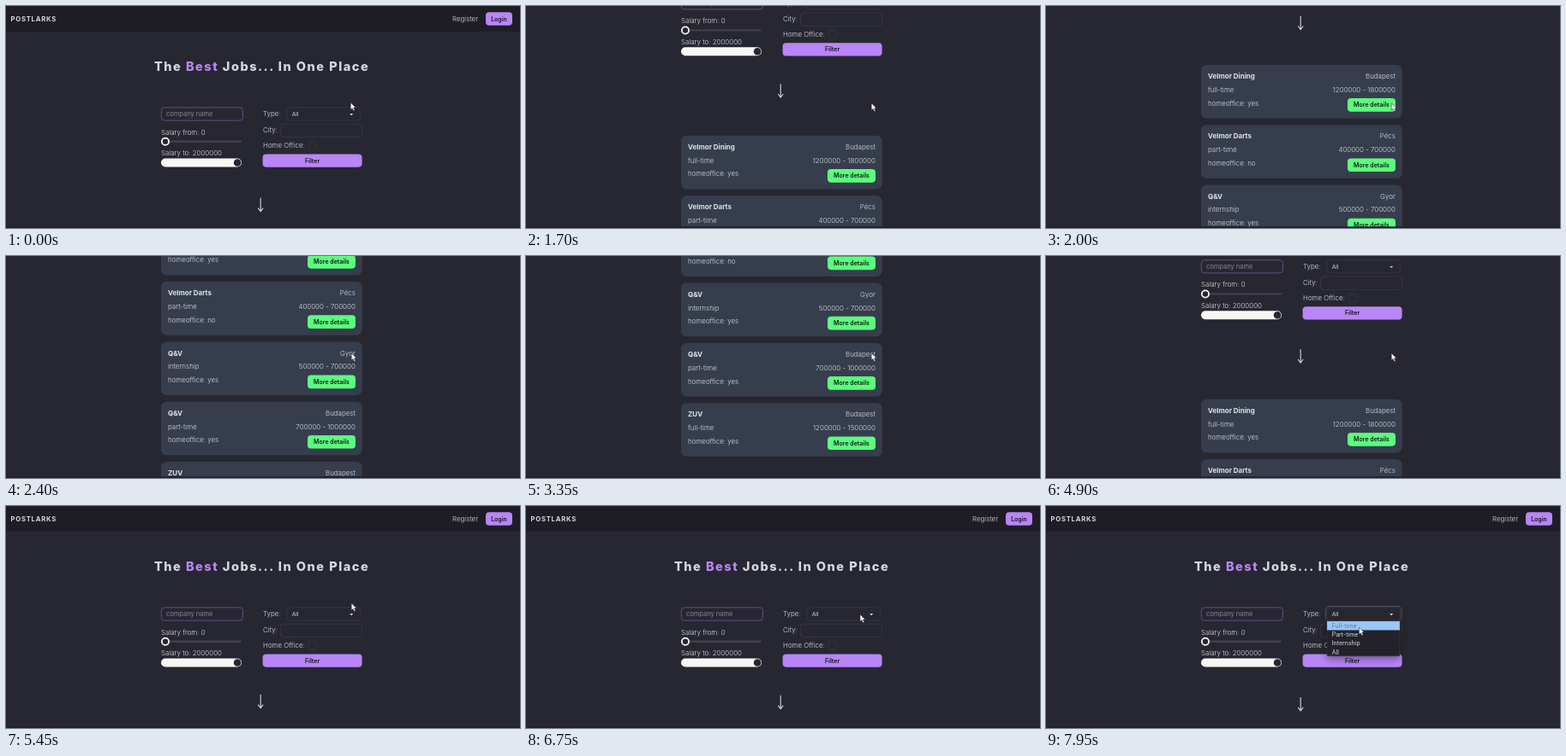
An HTML page for the animation above (8 s loop, 600x260 px).

```html
<!DOCTYPE html>
<html lang="en">
<head>
<meta charset="utf-8">
<title>Job board</title>
<style>
  html, body { margin: 0; width: 100%; height: 100%; overflow: hidden; background: #272731; }
  svg { display: block; width: 600px; height: 260px; }
  text { font: 350 7.95px Inter, "Open Sans", sans-serif; fill: #d9dae1; white-space: pre; }
  .end { text-anchor: end; }
  .mid { text-anchor: middle; }
  .button { font-size: 7px; font-weight: 600; fill: #17151f; text-anchor: middle; }
  .small { font-size: 7px; font-weight: 400; }
  .value { font-size: 6.5px; font-weight: 400; }
  .hint { font-size: 7.5px; font-weight: 400; fill: #85858f; }
  .title { font-size: 8px; font-weight: 700; fill: #dfe2e8; }
  .logo { font-size: 7.7px; font-weight: 700; letter-spacing: .1em; }
  .headline { font-size: 14.6px; font-weight: 800; letter-spacing: .1em; fill: #d5d9df; }
  .field { fill: none; stroke: #3e3d48; stroke-width: .7; }
</style>
</head>
<body>
<svg id="stage" viewBox="0 0 600 260"></svg>
<script>
const LOOP = 8000;
const PURPLE = '#b985f7', GREEN = '#5bfd7c', WHITE = '#f8f8f2', BACK = '#272731';

const text = (x, y, content, cls = '') => `<text x="${x}" y="${y}" class="${cls}">${content}</text>`;
const box = (x, y, w, h, r, attrs) =>
  `<rect x="${x}" y="${y}" width="${w}" height="${h}" rx="${r}" ${attrs}/>`;
const button = (x, y, w, h, color, label) =>
  box(x, y, w, h, 4.1, `fill="${color}"`) + text(x + w / 2, y + h / 2 + 2.5, label, 'button');
const field = (x, y, w, h, r = 4) => box(x, y, w, h, r, 'class="field"');

const jobs = [
  ['Velmor Dining', 'Budapest', 'full-time', '1200000 - 1800000', 'yes'],
  ['Velmor Darts', 'Pécs', 'part-time', '400000 - 700000', 'no'],
  ['Q&amp;V', 'Gyor', 'internship', '500000 - 700000', 'yes'],
  ['Q&amp;V', 'Budapest', 'part-time', '700000 - 1000000', 'yes'],
  ['ZUV', 'Budapest', 'full-time', '1200000 - 1500000', 'yes'],
];

const card = ([name, city, type, salary, remote], i) =>
  `<g transform="translate(0 ${282 + i * 70.3})">` +
  box(181, 0, 234.7, 62.6, 6.5, 'fill="#363e4d"') +
  text(189, 16.3, name, 'title') + text(407.8, 16.3, city, 'end') +
  text(189, 32, type) + text(407.8, 32, salary, 'end') +
  text(189, 47.7, 'homeoffice: ' + remote) +
  button(352, 39.2, 56, 15.7, GREEN, 'More details') + '</g>';

const header =
  box(0, 0, 600, 30, 0, 'fill="#1e1d26"') +
  text(5.5, 17.7, 'POSTLARKS', 'logo') +
  text(521, 17.9, 'Register') +
  button(560, 7.2, 31, 15.6, PURPLE, 'Login') +
  text(298.6, 75.8, `The <tspan fill="${PURPLE}">Best</tspan> Jobs... In One Place`, 'headline mid');

const form =
  box(181.2, 118.9, 95.3, 15.2, 4, 'fill="none" stroke="#76539b" stroke-width=".8"') +
  text(187, 129.2, 'company name', 'hint') +
  text(181, 150.6, 'Salary from: 0') +
  box(181, 157.6, 94, 2.2, 1.1, 'fill="#43424d"') +
  `<circle cx="186" cy="158.7" r="4.1" fill="${BACK}" stroke="${WHITE}" stroke-width="1.8"/>` +
  text(181, 175.3, 'Salary to: 2000000') +
  box(181, 178.5, 94, 10, 5, `fill="${WHITE}"`) +
  `<circle cx="270.1" cy="183.5" r="4.3" fill="${BACK}"/>` +
  text(300, 129.2, 'Type:') + field(327.7, 118.7, 86, 15.4) +
  text(333.7, 129, 'All', 'value') +
  '<path d="M401.2 126.1h4l-2 2.1z" fill="#d9d9e0"/>' +
  text(300, 148.4, 'City:') + field(320.3, 138.2, 95.2, 15.4) +
  text(300, 166.2, 'Home Office:') + field(353.2, 158.6, 9.4, 9.4, 3) +
  button(299.6, 173.4, 116, 15.3, PURPLE, 'Filter');

const options = ['Full-time', 'Part-time', 'Internship', 'All'];
const rowTop = i => 135 + i * 10.35;
const menu = '<g id="menu">' +
  box(326.4, 117.4, 88.6, 17.8, 4.5, 'fill="none" stroke="#53525d" stroke-width=".9"') +
  box(328, 134.8, 85, 41, 1.5,
    'fill="#23222b" stroke="#44434d" stroke-width=".5" style="filter:drop-shadow(0 3px 5px #0006)"') +
  box(328.1, 0, 84.8, 10.4, 0, 'id="hover" fill="#98c7f8"') +
  options.map((label, i) => text(333.7, rowTop(i) + 7.7, label, 'small option')).join('') + '</g>';

document.getElementById('stage').innerHTML =
  `<rect width="600" height="260" fill="${BACK}"/><g id="page">` + header + form +
  '<path id="arrow" d="M297.2 224.8v15.4M294.2 236.6l3 4 3-4" fill="none" stroke="#d5d6dc" stroke-width="1.1"/>' +
  jobs.map(card).join('') + menu + '</g>' +
  box(0, 258.3, 600, 1.7, 0, 'fill="#211f29"') +
  '<path id="cursor" d="M0 0v8.3l1.9-1.7 1.4 3.1 1.5-.7-1.4-3h2.6z" fill="#fff" stroke="#17161d" stroke-width=".5"/>';

const [page, arrow, menuNode, hover, cursor] =
  ['page', 'arrow', 'menu', 'hover', 'cursor'].map(id => document.getElementById(id));
const optionNodes = document.querySelectorAll('.option');

// Smooth monotone curve through [time, value] knots, flat at both ends and at turns.
function follow(knots, t) {
  const last = knots.length - 1;
  if (t <= knots[0][0]) return knots[0][1];
  if (t >= knots[last][0]) return knots[last][1];
  const slope = i => (knots[i + 1][1] - knots[i][1]) / (knots[i + 1][0] - knots[i][0]);
  const tangent = i => {
    if (i === 0 || i === last) return 0;
    const a = slope(i - 1), b = slope(i);
    return a * b <= 0 ? 0 : 2 * a * b / (a + b);
  };
  const i = knots.findIndex(k => k[0] > t) - 1;
  const span = knots[i + 1][0] - knots[i][0], u = (t - knots[i][0]) / span;
  const s = u * u * (3 - 2 * u);
  return knots[i][1] * (1 - s) + knots[i + 1][1] * s +
    span * u * (1 - u) * (tangent(i) * (1 - u) - tangent(i + 1) * u);
}

const scrollPath = [[1000, 0], [1700, 130], [2400, 322], [2850, 391],
                    [4300, 391], [4900, 114.6], [5220, 0]];
const cursorX = [[600, 402.3], [900, 403.2], [6100, 403.2], [6700, 390], [7100, 390], [7500, 365.4]];
const cursorY = [[600, 113.1], [900, 113.8], [6100, 113.8], [6700, 127], [7100, 127], [7500, 142.1]];
const MENU_OPENS = 6950;

function draw() {
  const t = performance.now() % LOOP;
  const x = follow(cursorX, t), y = follow(cursorY, t);
  const phase = t % 1000 / 1000;
  const hop = 4 * (1 - (2 * phase - 1) ** 2);
  const active = y < rowTop(0) ? 3 : 0;

  page.setAttribute('transform', `translate(0 ${-follow(scrollPath, t)})`);
  arrow.setAttribute('transform', `translate(0 ${-hop})`);
  cursor.setAttribute('transform', `translate(${x} ${y})`);
  menuNode.style.display = t >= MENU_OPENS ? '' : 'none';
  hover.setAttribute('y', rowTop(active));
  optionNodes.forEach((node, i) => { node.style.fill = i === active ? '#5f7a96' : ''; });
  requestAnimationFrame(draw);
}
draw();
</script>
</body>
</html>
```
